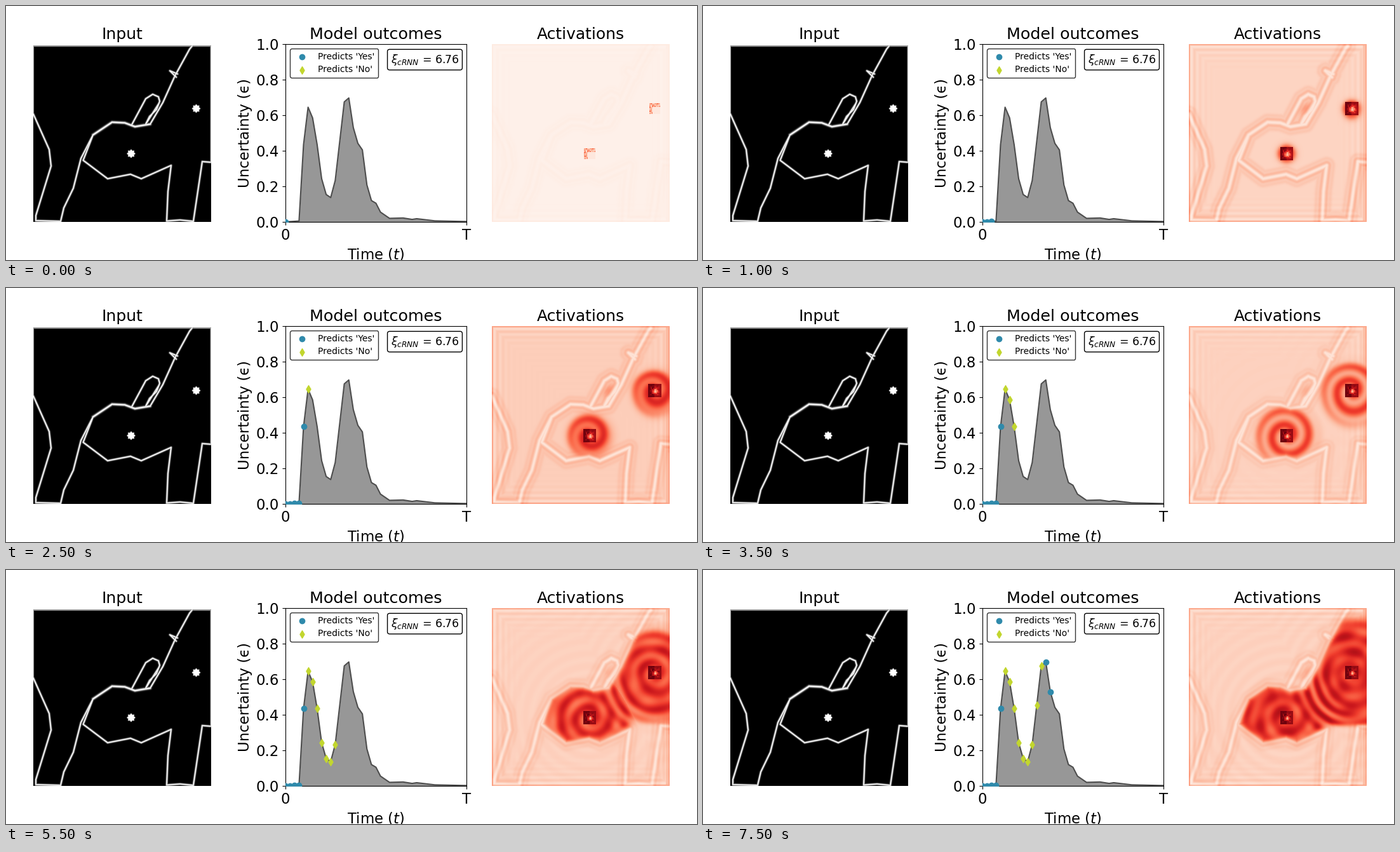
These frames come from a looping animation (1088x400 px, 8 s). A matplotlib script:

```python
import numpy as np
import matplotlib.pyplot as plt
from matplotlib.animation import FuncAnimation
from matplotlib.path import Path

W, H, DPI = 1088, 400, 100
SIDE = 280   # side of each picture panel in pixels
STEPS = 16
BLUE, GREEN = "#2f8aab", "#c2d62e"

plt.rcParams["font.family"] = "DejaVu Sans"
fig = plt.figure(figsize=(W / DPI, H / DPI), dpi=DPI, facecolor="white")


def add_panel(left, width, title, size=18):
    ax = fig.add_axes([left / W, 60 / H, width / W, SIDE / H])
    ax.set_title(title, fontsize=size)
    return ax


# ---------- geometry, in stage pixels of the input panel ----------
BACK = [(137, 203), (167, 183), (187, 184), (203, 190), (227, 186), (247, 152),
        (266, 110), (289, 68), (293, 63)]
BELLY = [(137, 203), (121.5, 243), (160, 272), (196, 265), (213, 272), (260, 251)]
FRONT_LEG = [(43, 170), (68, 226), (71, 252), (47, 330), (47, 338), (86, 339),
             (91, 318), (106, 287), (118, 240), (137, 203)]
HIND_LEG = [(260, 251), (255, 292), (253, 338.5), (274, 337), (295, 339),
            (309, 245), (322, 246)]
EAR = [(198, 187), (220, 146), (231, 139), (240, 143), (242, 150), (237, 163),
       (226, 174), (220, 186), (241, 153)]
TAIL = [(268, 112), (258, 102), (270, 107)]
FRAME = [(43, 170), (43, 63), (322.5, 63), (322.5, 246)]
DOTS = [(197, 232.5), (299.5, 161.5)]

X, Y = np.meshgrid(43.5 + np.arange(SIDE), 60.5 + np.arange(SIDE))


def line_distance(line):
    best = np.full(X.shape, 1e3)
    for (x0, y0), (x1, y1) in zip(line, line[1:]):
        dx, dy = x1 - x0, y1 - y0
        t = np.clip(((X - x0) * dx + (Y - y0) * dy) / (dx * dx + dy * dy), 0, 1)
        best = np.minimum(best, np.hypot(X - x0 - t * dx, Y - y0 - t * dy))
    return best


def bump(d, width):
    return np.exp(-(d / width) ** 2)


def sigmoid(v):
    return 1 / (1 + np.exp(-np.clip(v, -40, 40)))


def ramp(k, start, span):
    return np.clip((k - start) / span, 0, 1)


edge_d = np.min([line_distance(line) for line in
                 (BACK, BELLY, FRONT_LEG, HIND_LEG, EAR, TAIL)], axis=0)
body = BACK + [(340, 62), (340, 244), (262, 247)] + BELLY[-2:0:-1]
body_d = line_distance(body + body[:1])
inside = Path(body).contains_points(np.c_[X.ravel(), Y.ravel()]).reshape(X.shape)
mask = sigmoid((np.where(inside, body_d, -body_d) - 2) / 2.2)

# ---------- input drawing ----------
ink = np.maximum(bump(edge_d, 1.5), bump(line_distance(BACK[:5]), 2))
ink = np.maximum(ink, .75 * bump(line_distance(FRAME), 1))
for cx, cy in DOTS:
    dx, dy = X - cx, Y - cy
    star = np.hypot(dx, dy) - 5.8 - .7 * np.cos(8 * np.arctan2(dy, dx))
    ink = np.maximum(ink, sigmoid(-3 * star))
ink[Y < 62] = 1

ax_in = add_panel(43, SIDE, "Input")
ax_in.set_axis_off()
ax_in.imshow(ink, cmap="gray", vmin=0, vmax=1, aspect="auto")

# ---------- uncertainty curve ----------
KEYS = [(0, 0), (3, .005), (4, .435), (5, .645), (6, .585), (7, .435), (8, .243),
        (9, .154), (10, .137), (11, .233), (13, .675), (14, .697), (15, .53),
        (16, .442), (17, .405), (18, .208), (19, .12), (20, .105), (21, .055),
        (23, .02), (26, .022), (28, .014), (29, .018), (33, .006), (40, .002)]
TIME = np.arange(41)
CURVE = np.interp(TIME, *zip(*KEYS))
SAYS_NO = (TIME >= 5) & (TIME <= 13)

ax = add_panel(440, 285, "Model outcomes", 18.3)
ax.fill_between(TIME, CURVE, color="#979797", lw=0)
ax.plot(TIME, CURVE, color="#4d4d4d", lw=1.5)
ax.set_xlim(0, 40)
ax.set_ylim(0, 1)
ax.set_xticks([0, 40], ["0", "T"])
ax.tick_params(labelsize=16.5)
ax.set_xlabel("Time ($t$)", fontsize=16.4, labelpad=5)
ax.set_ylabel("Uncertainty (\u03f5)", fontsize=16.4)

yes = ax.scatter([], [], marker="o", color=BLUE, lw=1, label="Predicts 'Yes'", zorder=3)
no = ax.scatter([], [], marker="d", color=GREEN, lw=1, label="Predicts 'No'", zorder=3)
ax.legend(loc="upper left", fontsize=10, edgecolor="black")
fig.text(659.5 / W, 1 - 84.5 / H, r"$\xi_{cRNN}$ = 6.76", fontsize=12.5,
         ha="center", va="center",
         bbox=dict(boxstyle="round,pad=0.3,rounding_size=0.2", fc="white", ec="black"))

# ---------- activation map ----------
rim_d = np.minimum(np.minimum(X - 43, 323 - X), np.minimum(Y - 60, 340 - Y))
(x1, y1), (x2, y2) = DOTS
d1 = np.hypot(X - x1, Y - y1)
d2 = np.hypot(X - x2, (Y - y2) * np.where(Y < y2, 1.05, .88))
near = np.minimum(d1, d2)
angle = np.where(d1 < d2, np.arctan2(Y - y1, X - x1), np.arctan2(Y - y2, X - x2))
seam = bump(d1 - d2 + 6, 46) * sigmoid((Y - 130) / 12)
ear = bump(np.hypot(X * .8 + Y * .6 - 277.4, (Y * .8 - X * .6 + 6.8) / 2.2), 5)
grain = np.random.default_rng(4).random((12, 12))


def add_dot(v, k, cx, cy):
    dx, dy = X - cx, Y - cy
    box, r = np.maximum(abs(dx), abs(dy)), np.hypot(dx, dy)
    row, col = (np.clip(d // 2 + 6, 0, 11).astype(int) for d in (dy, dx))
    noise = grain[row, col]
    if k == 0:
        hot = (box < 9) & ((dx < -3) | (dy < -2))
        return np.where(hot, .1 + .38 * noise, np.where(box < 9, .08, v))
    if k == 1:
        v = np.maximum(v, .5 * bump(r, 10))
        hot = (box < 9) & (r > 3.5) & ~((dx > 2) & (abs(dy) < 4))
        return np.where(hot, .62 + .38 * noise, v)
    core = np.where(box > 7, .9, .78 + .2 * noise) + .08 * (dx < 0)
    core -= .62 * bump(np.hypot(dx - 1, dy - 1), 5 - 2 * ramp(k, 3, 5))
    return np.where(box < 10.5, core, v)


def spread(v, k):
    """Activity that grows from both dots and fills the body."""
    n = k - 2
    radius = 13 + 7.1 * n - .1 * n * n
    level = .7 - .22 * ramp(k, 3, 4) + .18 * ramp(k, 7, 5)
    late = ramp(k, 7, 6)
    swirl = np.cos(2 * np.pi * (near - radius + 9) / 24 + angle + .6)
    blots = np.cos(X / 8.5 + .35 * k + Y / 21) * np.cos(Y / 9.5 - .3 * k)
    bands = np.cos(2 * np.pi * d2 / 18 - .5 * k + .25 * np.sin(Y / 9))
    tex = swirl + late * (.6 * blots - .55 * swirl)
    tex += late * seam * (1.25 * bands - tex)
    amp = .03 + .13 * ramp(k, 2, 5)
    front = sigmoid((radius - near) / (2.5 + .25 * n)) * mask
    return v + front * (level + amp * tex - v)


def activation(k):
    settle = ramp(k, 3, 4)
    v = .03 + .17 * ramp(k, 0, 2.5) - .025 * settle
    halo = .02 + .07 * ramp(k, 0, 1.5) - .03 * settle
    dip = .1 * ramp(k, 0, 3) - .03 * settle
    v = v + halo * (bump(edge_d - 5, 2.6) + .5 * bump(edge_d - 11, 3))
    v -= dip * bump(edge_d, 2.2)

    rim = .012 + .045 * ramp(k, 0, 2)
    v += rim * np.cos(2 * np.pi * rim_d / 9) * np.exp(-rim_d / 13)
    v += 1.6 * rim * ((X > 317) | (rim_d < 2))
    v += (.2 * ramp(k, 0, 3) - .12 * settle) * ear
    v += .02 * ramp(k, 5, 8) * np.cos(2 * np.pi * near / 20 - .6 * k) * np.exp(-near / 130)

    if k >= 2:
        v = spread(v, k)
    for cx, cy in DOTS:
        v = add_dot(v, k, cx, cy)
    return np.clip(v, 0, 1)


ax_act = add_panel(765, SIDE, "Activations")
ax_act.set_axis_off()
maps = [activation(k) for k in range(STEPS)]
heat = ax_act.imshow(maps[0], cmap="Reds", vmin=0, vmax=1, aspect="auto")


def draw(k):
    seen = TIME <= k
    for dots, marks in ((yes, seen & ~SAYS_NO), (no, seen & SAYS_NO)):
        dots.set_offsets(np.c_[TIME[marks], CURVE[marks]])
    heat.set_data(maps[k])
    return yes, no, heat


anim = FuncAnimation(fig, draw, frames=STEPS, interval=500, repeat=True, repeat_delay=0)
plt.show()
```
